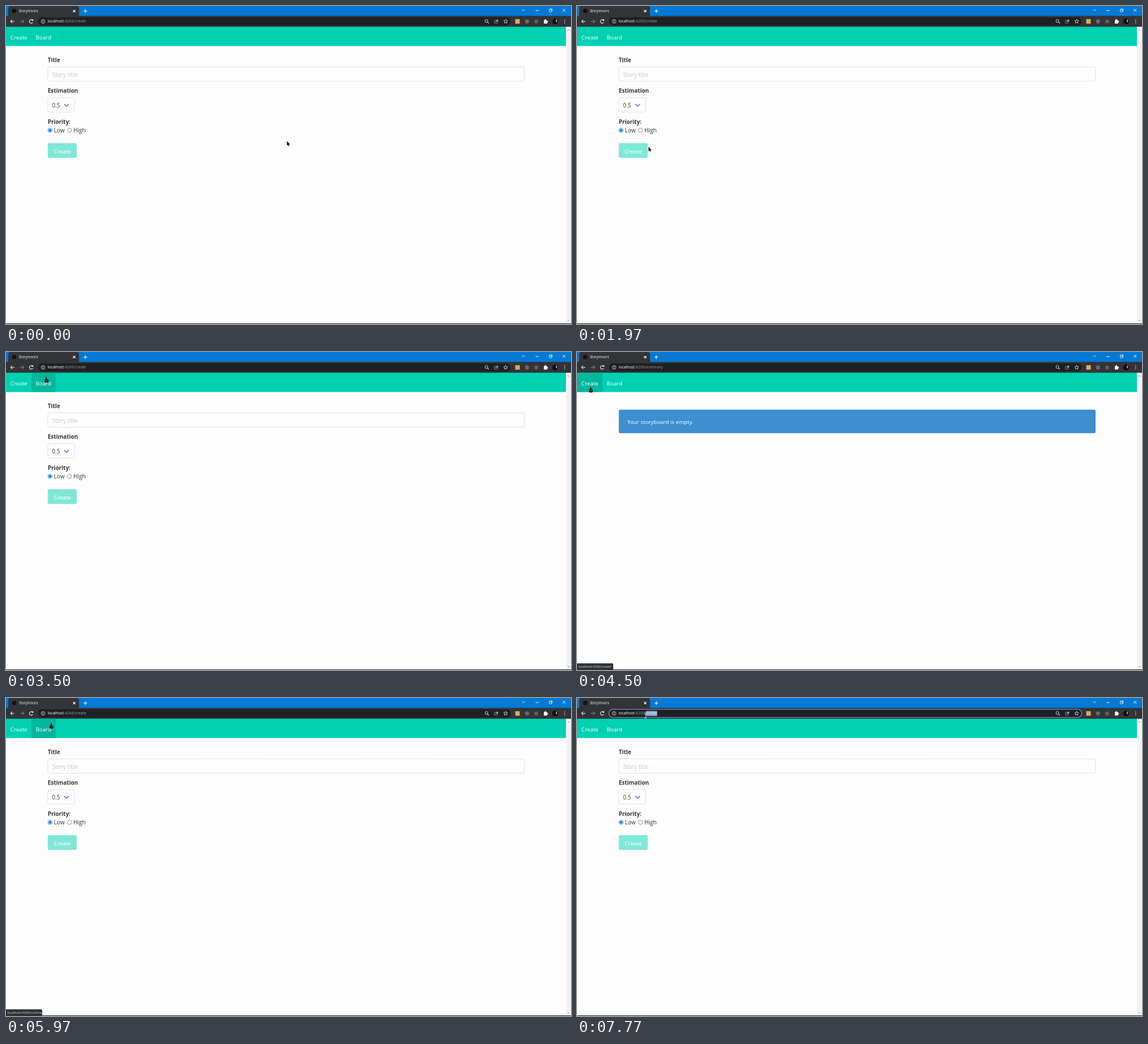
Animation of 998x561 px, one loop 8 s. Source, as an HTML page with a canvas:

```html
<!DOCTYPE html>
<html lang="en">
<head>
<meta charset="utf-8">
<title>Storymoors</title>
<style>
  html, body { margin: 0; width: 100%; height: 100%; overflow: hidden; background: #fdfdfe; }
  canvas { display: block; width: 998px; height: 561px; }
</style>
</head>
<body>
<canvas id="stage"></canvas>
<script>
const W = 998, H = 561, LOOP = 8000;
const FONT = '"Open Sans", "Noto Sans", sans-serif';
const PAPER = '#fdfdfe', BAR = '#333438', LIGHT = '#e8eaed', DIM = '#9a9da2', INK = '#363636';
const NAV_TOP = 36.6, NAV_H = 34, NAV_SPLIT = 45, NAV_END = 87.5, PAGE_W = 989, LEFT = 73.8;
const TO_BOARD = 3800, TO_CREATE = 5640, FOCUS = 6260, SELECT = 6700;

const canvas = document.getElementById('stage');
const ctx = canvas.getContext('2d');
const dpr = window.devicePixelRatio || 1;
canvas.width = W * dpr;
canvas.height = H * dpr;

// Where the pointer rests or turns
const STOPS = [
  { t: 30, x: 496, y: 238 },
  { t: 1970, x: 126, y: 248 },
  { t: 3400, x: 71, y: 44 },
  { t: 3850, x: 71, y: 46 },
  { t: 4400, x: 24, y: 62 },
  { t: 4900, x: 24, y: 62 },
  { t: 5150, x: 60, y: 56 },
  { t: 5430, x: 25, y: 58 },
  { t: 5700, x: 25, y: 58 },
  { t: 6300, x: 153, y: 26 },
  { t: 6700, x: 144, y: 27 },
  { t: 7700, x: 121, y: 31 }
];

const smooth = u => u * u * (3 - 2 * u);
const clamp = u => Math.max(0, Math.min(1, u));

function pointer(t) {
  const next = STOPS.findIndex(s => s.t > t);
  if (next === 0) return STOPS[0];
  if (next < 0) return STOPS[STOPS.length - 1];
  const a = STOPS[next - 1], b = STOPS[next];
  const k = smooth(clamp((t - a.t) / (b.t - a.t)));
  return { x: a.x + (b.x - a.x) * k, y: a.y + (b.y - a.y) * k };
}

function rect(x, y, w, h, color) {
  ctx.fillStyle = color;
  ctx.fillRect(x, y, w, h);
}

function paint(fill, stroke, width) {
  if (fill) { ctx.fillStyle = fill; ctx.fill(); }
  if (stroke) { ctx.strokeStyle = stroke; ctx.lineWidth = width; ctx.stroke(); }
}

function box(x, y, w, h, r, fill, stroke, width = 0.8) {
  ctx.beginPath();
  ctx.roundRect(x, y, w, h, r);
  paint(fill, stroke, width);
}

function disc(x, y, r, fill, stroke, width = 0.9) {
  ctx.beginPath();
  ctx.arc(x, y, r, 0, 2 * Math.PI);
  paint(fill, stroke, width);
}

function line(x1, y1, x2, y2, color, width = 1) {
  ctx.beginPath();
  ctx.moveTo(x1, y1);
  ctx.lineTo(x2, y2);
  paint(null, color, width);
}

// Two strokes meeting at a tip; (dx, dy) is the way the tip points.
function chevron(x, y, dx, dy, r, color, width = 1) {
  for (const side of [-1, 1])
    line(x, y, x - r * (dx + side * dy), y - r * (dy + side * dx), color, width);
}

function cross(x, y, r, color, width = 1) {
  line(x - r, y - r, x + r, y + r, color, width);
  line(x - r, y + r, x + r, y - r, color, width);
}

function triangle(x, y, r, dir, color) {
  ctx.beginPath();
  ctx.moveTo(x - r, y);
  ctx.lineTo(x + r, y);
  ctx.lineTo(x, y + r * dir);
  paint(color);
}

function star(x, y, r, color) {
  ctx.beginPath();
  for (let i = 0; i < 10; i++) {
    const a = (i / 5 - 0.5) * Math.PI, d = i % 2 ? r * 0.45 : r;
    ctx.lineTo(x + d * Math.cos(a), y + d * Math.sin(a));
  }
  ctx.closePath();
  paint(null, color, 0.8);
}

function text(str, x, y, size, color, weight = 400) {
  ctx.font = `${weight} ${size}px ${FONT}`;
  ctx.fillStyle = color;
  ctx.fillText(str, x, y);
  return ctx.measureText(str).width;
}

function drawTabs() {
  rect(0, 0, W, 18, '#0479d5');
  box(4, 0, 125, 18, [4, 4, 0, 0], BAR);
  disc(14.5, 8.7, 3.8, '#111214');
  text('Storymoors', 22.7, 11, 6.2, '#fff');
  cross(120.5, 9, 2, '#fff', 1.1);
  line(137, 9, 143.5, 9, '#fff', 1.1);
  line(140.2, 5.7, 140.2, 12.3, '#fff', 1.1);
  chevron(914, 8.5, 0, 1, 2.5, '#d8ebfa');
  line(935.5, 8, 941, 8, '#fff');
  box(960.7, 5, 4, 4, 0.3, null, '#fff');
  box(959.5, 6.2, 4, 4, 0.3, '#0479d5', '#fff');
  cross(985.7, 7.4, 2.5, '#fff');
}

function drawIcons() {
  const y = 27.2;
  for (const [x, dir, color] of [[11.4, -1, LIGHT], [28, 1, '#7b7d82']]) {
    line(x - 3.4, y, x + 3.4, y, color, 1.1);
    chevron(x + 3.4 * dir, y, dir, 0, 3, color, 1.1);
  }
  ctx.beginPath();
  ctx.arc(44.5, y, 3.1, 0.5, 5.5);
  paint(null, LIGHT, 1.2);
  rect(45.6, y - 3.6, 2.5, 2.5, LIGHT);

  disc(65.5, y, 3.3, null, LIGHT, 0.8);
  line(65.5, y - 0.6, 65.5, y + 1.8, LIGHT);
  rect(65, y - 2, 1, 1, LIGHT);

  disc(848.6, y - 0.8, 2.5, null, LIGHT);
  line(850.4, y + 1, 852.8, y + 3.4, LIGHT, 1.1);
  box(862.8, y - 2, 5.6, 5, 0.5, null, DIM);
  line(865, y + 0.5, 869, y - 1.8, LIGHT);
  chevron(869, y - 1.8, 1, 0, 1.6, LIGHT);
  star(882.6, y, 3.8, LIGHT);

  rect(899.5, y - 4, 8, 8, '#dfa755');
  disc(920.3, y, 3.7, '#66696e');
  disc(936.6, y, 3.5, '#74564c');
  rect(950, y - 2.2, 5.8, 6, '#fff');
  disc(952.7, y - 2.6, 1.3, '#fff');
  disc(956.1, y + 0.6, 1.3, '#fff');
  disc(970, y, 5, '#0c0c0d');
  box(971.4, y - 3.4, 1.8, 5, 0.9, '#b9babc');
  for (const dy of [-2.8, 0, 2.8]) disc(986.8, y + dy, 0.75, LIGHT);
}

// Number of letters before the gap nearest to x
function letterAt(str, from, x) {
  const gap = i => Math.abs(from + ctx.measureText(str.slice(0, i)).width - x);
  let best = 0;
  for (let i = 1; i <= str.length; i++) if (gap(i) < gap(best)) best = i;
  return best;
}

function drawAddress(t, page, mouse) {
  const size = 6.8, base = 29.4, path = '/' + page;
  let x = 73.5;
  x += text('localhost', x, base, size, '#fff');
  x += text(':4200', x, base, size, DIM);
  const end = x + text(path, x, base, size, DIM);
  if (t < FOCUS) return;
  const n = t < SELECT ? path.length : letterAt(path, x, mouse.x);
  const start = x + ctx.measureText(path.slice(0, n)).width;
  if (n === path.length) return rect(end + 0.3, 23, 0.8, 8.5, LIGHT);
  rect(start, 22.8, end - start, 9, '#819fcb');
  text(path.slice(n), start, base, size, '#fff');
}

function drawToolbar(t, page, mouse) {
  rect(0, 17.5, W, 20, BAR);
  box(56.5, 20, 835, 14.2, 7.1, '#1f2023', t >= FOCUS ? '#7da5e8' : null, 1.1);
  drawIcons();
  drawAddress(t, page, mouse);
}

function drawNav(t, hover) {
  const shade = '#00b89c', base = 58.6;
  const boardLit = hover === 'summary' || (t > 5000 && t < 5500);
  rect(0, NAV_TOP, PAGE_W, NAV_H, '#00d1b2');
  if (hover === 'create') rect(0, NAV_TOP, NAV_SPLIT, NAV_H, shade);
  if (boardLit) rect(NAV_SPLIT, NAV_TOP, NAV_END - NAV_SPLIT, NAV_H, shade);
  text('Create', 7.7, base, 9.8, '#fff');
  text('Board', 52.4, base, 9.8, '#fff');
}

function radio(x, label, on) {
  const y = 219.2, blue = '#0075e8';
  disc(x, y, 3.7, '#fff', on ? blue : '#85858a');
  if (on) disc(x, y, 2.3, blue);
  text(label, x + 6.7, y + 4, 10.2, INK);
}

function drawForm() {
  const border = '#dadadc';
  const label = (str, y) => text(str, LEFT, y, 9.9, INK, 700);
  label('Title', 98.6);
  box(74, 107.3, 841.7, 25.4, 2.7, PAPER, border);
  text('Story title', 81.4, 124.5, 10.1, '#c5c5c8');
  label('Estimation', 153.2);
  box(74, 161.7, 47.3, 25.5, 2.7, PAPER, border);
  text('0.5', 81.3, 179.2, 10, INK);
  chevron(107, 177, 0, 1, 4, '#485fc7', 1.5);
  label('Priority:', 207.7);
  radio(77.8, 'Low', true);
  radio(112.2, 'High', false);
  box(LEFT, 242, 51.2, 26, 2.7, '#80e8d8');
  text('Create', 84.5, 259.7, 9.8, '#fff');
}

function drawBoard() {
  box(LEFT, 101.7, 842.2, 41.6, 2.7, '#3e8ed0');
  text('Your storyboard is empty.', 89, 127.2, 9.75, '#fff');
}

function drawScrollbar() {
  rect(PAGE_W, NAV_TOP, W - PAGE_W, H, '#f2f2f2');
  triangle(993.5, 43, 2, -1, '#a5a5a8');
  triangle(993.5, 554.5, 2, 1, '#a5a5a8');
  rect(0, 560, W, 1, '#1d1e21');
}

function drawStatus(page) {
  box(0, 549.3, 64, 11.7, [0, 2, 0, 0], '#303236');
  text('localhost:4200/' + page, 2.6, 557.2, 5.75, '#d4d6d9');
}

function drawArrow() {
  ctx.beginPath();
  ctx.moveTo(0, 0);
  ctx.lineTo(0, 8.4);
  ctx.lineTo(5.8, 5.9);
  ctx.closePath();
  paint('#0a0a0a', '#fff', 0.5);
  line(2, 5, 3.8, 9, '#0a0a0a', 1.4);
}

function drawHand() {
  box(-0.9, 0, 1.9, 7, 0.9, '#101010');
  box(-2.6, 3.6, 6.4, 6, 1.8, '#101010');
  for (const x of [-0.4, 1.4]) rect(x, 5, 0.5, 2.3, '#dff3ef');
}

function drawBeam() {
  const color = '#d0d2d5';
  line(0, -4.5, 0, 4.5, color, 0.9);
  for (const y of [-4.6, 4.6]) line(-1.8, y, 1.8, y, color, 0.8);
}

function draw(t) {
  const mouse = pointer(t);
  const onNav = mouse.y > NAV_TOP && mouse.y < NAV_TOP + NAV_H && mouse.x < NAV_END;
  const hover = onNav ? (mouse.x < NAV_SPLIT ? 'create' : 'summary') : '';
  const page = t >= TO_BOARD && t < TO_CREATE ? 'summary' : 'create';
  ctx.setTransform(dpr, 0, 0, dpr, 0, 0);
  rect(0, 0, W, H, PAPER);
  drawTabs();
  drawToolbar(t, page, mouse);
  drawNav(t, hover);
  if (page === 'create') drawForm(); else drawBoard();
  drawScrollbar();
  if (hover && t > 3560) drawStatus(hover);
  ctx.translate(mouse.x, mouse.y);
  if (onNav) drawHand();
  else if (mouse.y < 35) drawBeam();
  else drawArrow();
}

function tick() {
  draw(performance.now() % LOOP);
  requestAnimationFrame(tick);
}
tick();
</script>
</body>
</html>
```
